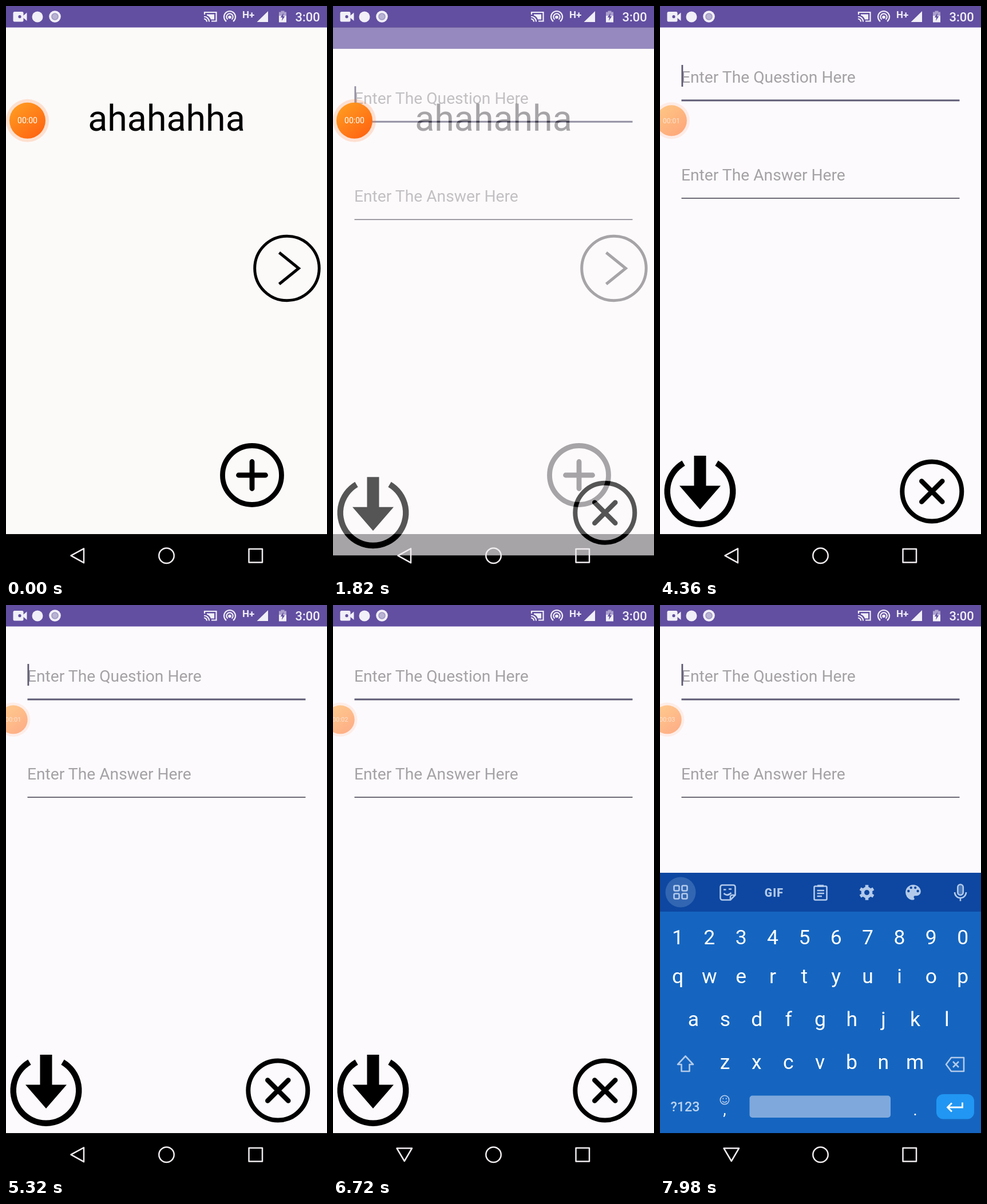
Recreate the animation shown at these times as an HTML page. Size 561 by 998 pixels, loop 8000 ms.

```html
<!DOCTYPE html>
<html lang="en">
<head>
<meta charset="utf-8">
<title>Flashcard app</title>
<style>
  html, body { margin: 0; width: 100%; height: 100%; overflow: hidden; background: #000; }
  svg { display: block; width: 561px; height: 998px; font-family: Roboto, sans-serif; }
  .line { fill: none; stroke: #000; }
  .round { stroke-linecap: round; stroke-linejoin: round; }
  .hint { font-size: 28.22px; fill: #a5a2a6; }
  .icon { fill: none; stroke: #b3caea; stroke-width: 2.6; stroke-linejoin: round; }
  .solid { fill: #b3caea; }
</style>
</head>
<body>
<svg viewBox="0 0 561 998">
  <defs>
    <linearGradient id="orange" x1="0.1" y1="0" x2="0.9" y2="1">
      <stop offset="0" stop-color="#ff9f22"/>
      <stop offset="1" stop-color="#ff6010"/>
    </linearGradient>
  </defs>

  <!-- card screen -->
  <g id="card">
    <rect width="561" height="998"/>
    <rect y="37" width="561" height="886" fill="#fcfaf9"/>
    <rect width="561" height="37.5" fill="#624fa1"/>
    <text x="280.5" y="218" font-size="62.7" text-anchor="middle">ahahahha</text>
    <g class="line">
      <circle cx="491" cy="458.5" r="56.3" stroke-width="5"/>
      <path d="M477.5 431L511.5 458.5L477.5 486" stroke-width="5"/>
      <circle cx="430" cy="820" r="51.5" stroke-width="8.8"/>
      <path class="round" d="M406.5 820H453.5M430 796.5V843.5" stroke-width="8.8"/>
    </g>
  </g>

  <!-- form screen -->
  <g id="form">
    <rect width="561" height="998"/>
    <rect y="37" width="561" height="886" fill="#fdfafd"/>
    <rect width="561" height="37.5" fill="#624fa1"/>
    <text class="hint" x="37" y="133.5">Enter The Question Here</text>
    <text class="hint" x="37" y="305">Enter The Answer Here</text>
    <rect id="caret" x="37.5" y="103" width="2.8" height="38" fill="#5d5875"/>
    <rect x="37.5" y="163.5" width="486" height="3" fill="#5d5a75"/>
    <rect x="37.5" y="335.2" width="486" height="1.6" fill="#4b4857"/>
    <path class="line" d="M41 799A57.3 57.3 0 1 0 99 799" stroke-width="10.4"/>
    <path d="M59.5 786H80.5V838.5H106L70 880L34 838.5H59.5Z"/>
    <g class="line" stroke-width="8">
      <circle cx="475.3" cy="848.5" r="52"/>
      <path class="round" d="M457.3 830.5l36 36m0-36l-36 36" stroke-width="8.5"/>
    </g>
  </g>

  <!-- keyboard -->
  <g id="keyboard">
    <rect y="468" width="561" height="530"/>
    <rect y="468" width="561" height="455" fill="#1565c0"/>
    <rect y="468" width="561" height="68" fill="#0d47a1"/>
    <circle cx="36" cy="502" r="26.5" fill="#3266b2"/>
    <g class="icon">
      <g id="grid"></g>
      <path d="M109 489.5H128a3.5 3.5 0 0 1 3.5 3.5V507L123 515.5H109a3.5 3.5 0 0 1-3.5-3.5V493a3.5 3.5 0 0 1 3.5-3.5ZM131.5 507H126a3 3 0 0 0-3 3V515.5"/>
      <path d="M111.5 504q6 6 13-1M111 497.5h4.5M120 496.5h5"/>
      <rect x="269.5" y="491.5" width="22" height="24" rx="2"/>
      <path d="M274.5 499H287M274.5 504H287M274.5 509H283"/>
      <rect class="solid" x="275" y="489" width="11" height="4" stroke="none"/>
      <rect class="solid" fill-opacity=".35" x="520.3" y="488.5" width="9.5" height="18.5" rx="4.75"/>
      <path d="M515 502a10 10 0 0 0 20 0M525 512V517.5"/>
    </g>
    <text x="199.5" y="509.5" font-size="19.5" font-weight="900" letter-spacing="1.2" text-anchor="middle" class="solid">GIF</text>
    <g id="gear" fill="none" stroke="#b3caea"><circle cx="361.5" cy="502.5" r="7.2" stroke-width="5.4"/></g>
    <g transform="translate(424.7 484.5) scale(1.48)">
      <path class="solid" d="M12 3a9 9 0 0 0 0 18a1.5 1.5 0 0 0 1.1-2.5a1.5 1.5 0 0 1 1.1-2.5H16a5 5 0 0 0 5-5C21 6.6 17 3 12 3Z"/>
      <g fill="#0d47a1"><circle cx="6.5" cy="10.5" r="1.5"/><circle cx="9.5" cy="6.5" r="1.5"/><circle cx="14.5" cy="6.5" r="1.5"/><circle cx="17.5" cy="10.5" r="1.5"/></g>
    </g>
    <g id="keys" fill="#fff" font-size="35.5" text-anchor="middle"></g>
    <g class="icon">
      <path d="M44.5 788.5L58 803H51.5V815H37.5V803H31Z"/>
      <path d="M509 791H531V815H509L500 803ZM512 798l10 10m0-10l-10 10"/>
      <g stroke-width="1.7"><circle cx="113" cy="865" r="7.7"/><path d="M109 867q4 4.5 8 0M110.3 861.5v2.4M115.7 861.5v2.4"/></g>
    </g>
    <text x="18.5" y="885" font-size="23.3" font-weight="500" fill="#bcd3ef">?123</text>
    <g fill="#fff" font-size="27" text-anchor="middle"><text x="113" y="891">,</text><text x="446" y="892">.</text></g>
    <rect x="156.5" y="857.5" width="246.5" height="38.5" rx="5" fill="#7fa9dc"/>
    <rect x="483" y="855" width="66" height="43.5" rx="12" fill="#2196f3"/>
    <path d="M528.5 869.5V878H503M510 870.5L502.5 878L510 885.5" fill="none" stroke="#fff" stroke-width="2.8"/>
  </g>

  <!-- system bars -->
  <g fill="#f1eff7">
    <rect x="12.5" y="10" width="18" height="17.5" rx="2.5"/>
    <path d="M30 17L36.5 11.5V26L30 20.5Z"/>
    <circle cx="24" cy="18.7" r="2.6" fill="#624fa1"/>
    <circle cx="55" cy="19" r="9.5"/>
    <circle cx="85.5" cy="18.5" r="10.3"/>
    <circle cx="85.5" cy="18.5" r="5.5" fill="#b9b3d3" stroke="#9d95c2" stroke-width="1.5"/>
    <g fill="none" stroke="#f1eff7" stroke-width="2.2">
      <path d="M347 15V11H367.5V26.5H359M346 18.5a9 9 0 0 1 9 9M346 22.5a5 5 0 0 1 5 5"/>
      <path d="M385 27a10 10 0 1 1 12 0M387.5 23.5a5.7 5.7 0 1 1 7 0"/>
    </g>
    <path d="M351 14.5H364V23.5H358Q356 18 351 16.5Z"/>
    <circle cx="391" cy="19.5" r="2.8"/>
    <text x="413" y="21.3" font-size="17" font-weight="700">H+</text>
    <path d="M458 9V28H438.5Z"/>
    <path d="M477 10.5H480.5V8.5H486.5V10.5H490V17H477Z" opacity=".5"/>
    <path d="M477 17H490V28.5H477Z"/>
    <path d="M485 12L479.8 20H483L482 26L487.3 18H484.2Z" fill="#624fa1"/>
    <text x="505.5" y="27" font-size="22" font-weight="500">3:00</text>
  </g>
  <g fill="none" stroke="#f0ecef" stroke-width="2.5" stroke-linejoin="round">
    <path id="back"/>
    <circle cx="280.5" cy="960.7" r="13.2"/>
    <rect x="424.5" y="949" width="23.5" height="23.5"/>
  </g>

  <!-- recorder bubble -->
  <g id="bubble">
    <circle r="37.5" fill="#ff7a30" fill-opacity=".2"/>
    <circle r="31.5" fill="url(#orange)"/>
    <text id="clock" y="5" font-size="14" text-anchor="middle" fill="#fff"></text>
  </g>
</svg>
<script>
const LOOP = 8000;
const $ = id => document.getElementById(id);
const clamp = v => Math.min(1, Math.max(0, v));
const part = (t, from, to) => clamp((t - from) / (to - from));
const out = (p, power) => 1 - (1 - p) ** power;
const inOut = p => (1 - Math.cos(Math.PI * p)) / 2;
const mix = (a, b, p) => a + (b - a) * p;

const rows = [['1234567890', 31, 592.5], ['qwertyuiop', 31, 661], ['asdfghjkl', 58.5, 736], ['zxcvbnm', 113.5, 811]];
$('keys').innerHTML = rows.map(([chars, x, y]) =>
  [...chars].map((c, i) => `<text x="${x + 55.35 * i}" y="${y}">${c}</text>`).join('')).join('');
$('grid').innerHTML = [24.5, 38.5].map(x => [490.5, 504.5].map(y =>
  `<rect x="${x}" y="${y}" width="9" height="9" rx="2"/>`).join('')).join('');
for (let a = 0; a < 360; a += 60)
  $('gear').innerHTML += `<path d="M361.5 494V489.3" stroke-width="5.6" transform="rotate(${a} 361.5 502.5)"/>`;

function openForm(t) {
  // the first updates arrive only every 140 ms
  const s = t < 2100 ? 1820 + Math.floor((t - 1820) / 140) * 140 : t;
  const y = t < 2300 ? 80 * (1 - out(part(s, 1696, 2571), 5)) : 0;
  $('form').setAttribute('opacity', t < 1820 ? 0 : out(part(s, 1703, 2203), 4));
  $('form').setAttribute('transform', `translate(0 ${y})`);
  const caretOn = t < 2800 || (t >= 4180 && t < 5600) || t >= 7150;
  $('caret').setAttribute('opacity', caretOn ? 1 : 0);
}

function moveBubble(t) {
  const first = inOut(part(t, 3760, 4510));
  const p = 0.78 * first + 0.22 * inOut(part(t, 4590, 5330));
  $('bubble').setAttribute('transform', `translate(${mix(37.5, 12.7, p)} 200.3) scale(${mix(1, 0.795, p)})`);
  $('bubble').setAttribute('opacity', mix(1, 0.5, first));
  const seconds = [3080, 5600, 7980].filter(at => t >= at).length;
  $('clock').textContent = '00:0' + seconds;
  $('clock').setAttribute('opacity', mix(1, 0.6, first));
}

function showKeyboard(t) {
  const shown = out(part(t, 6740, 7240), 5);
  $('keyboard').setAttribute('opacity', shown);
  $('keyboard').setAttribute('transform', `translate(0 ${45.5 * (1 - shown)})`);
  $('back').setAttribute('d', t < 6320 ? 'M113.5 960.7L136 948.3V973.2Z' : 'M111.5 949.5H138L124.8 972Z');
}

function draw(t) {
  openForm(t);
  moveBubble(t);
  showKeyboard(t);
}

let start;
function tick(now) {
  start ??= now;
  draw((now - start) % LOOP);
  requestAnimationFrame(tick);
}
draw(0);
requestAnimationFrame(tick);
</script>
</body>
</html>
```
